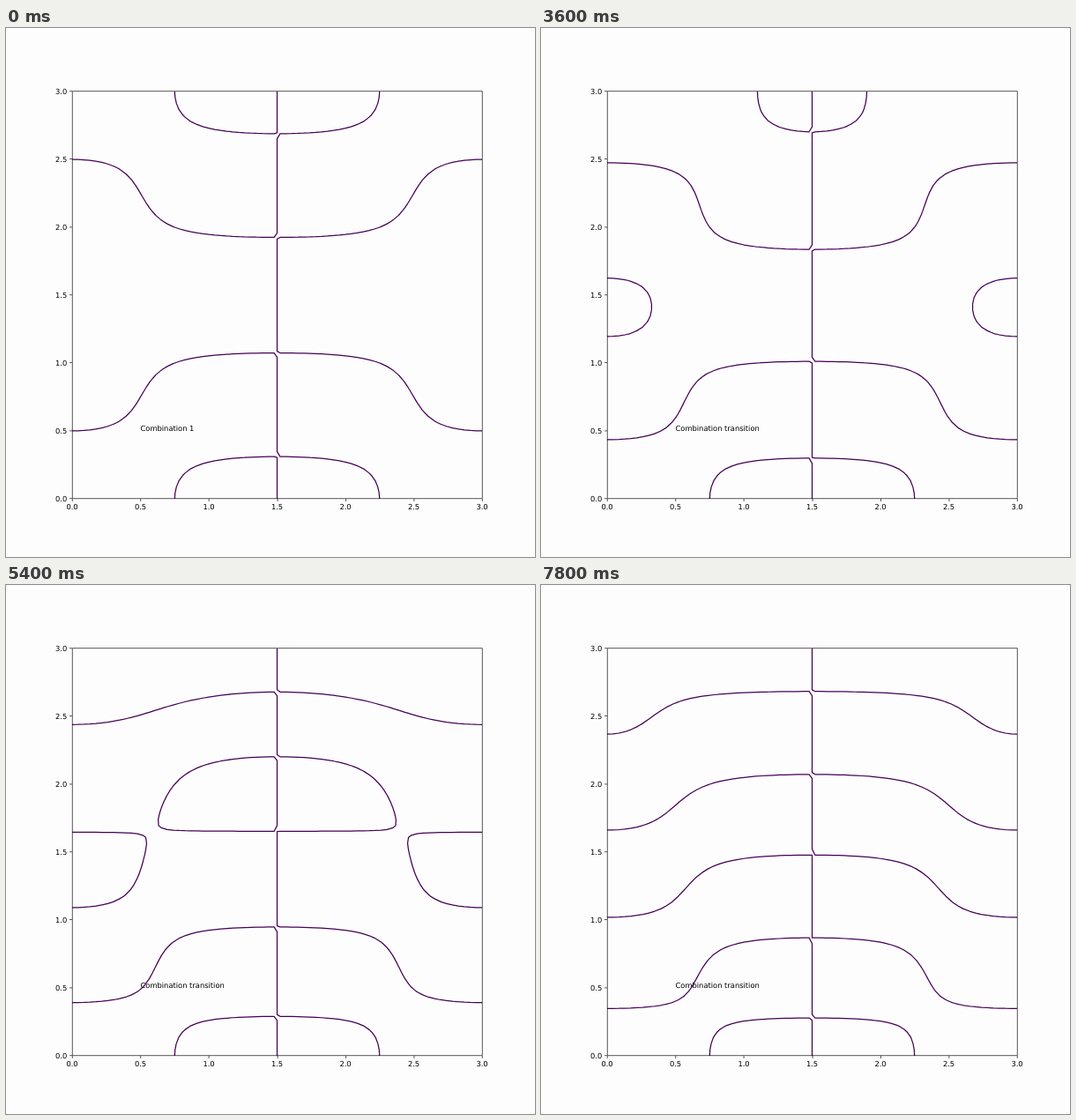
These frames come from a looping animation (600x600 px, 8 s). An HTML page:

```html
<!DOCTYPE html>
<html lang="en">
<head>
<meta charset="utf-8">
<title>Nodal lines of a mode combination</title>
<style>
  html, body { margin: 0; width: 100%; height: 100%; overflow: hidden; background: #fefdfe; }
  svg { display: block; width: 600px; height: 600px; }
  text { font: 8.333px "DejaVu Sans", sans-serif; fill: #000; text-rendering: geometricPrecision; }
  #axes { fill: none; stroke: #000; stroke-width: .667; }
  #nodes { fill: none; stroke: #440154; stroke-width: 1.25; stroke-linecap: round; }
</style>
</head>
<body>
<svg viewBox="0 0 600 600">
  <clipPath id="plot"><rect x="75" y="72" width="465" height="462"/></clipPath>
  <path id="nodes" clip-path="url(#plot)"/>
  <path id="axes"/>
  <g id="labels"></g>
  <text id="caption" x="152.5" y="457"></text>
</svg>
<script>
const LOOP = 8000, HOLD = 1500, STEPS = 49;
const N = 70, LAST = N - 1;
const LEFT = 75, BOTTOM = 534, WIDTH = 465, HEIGHT = 462;
const el = id => document.getElementById(id);
const px = u => LEFT + WIDTH * u;
const py = v => BOTTOM - HEIGHT * v;

function drawAxes() {
  const snapX = x => (Math.floor(x / .6 + .5) + .5) * .6;
  const snapY = y => (Math.floor(y / .6 + .5) - .5) * .6;
  const l = snapX(px(0)), r = snapX(px(1)), b = snapY(py(0)), t = snapY(py(1));
  let d = `M${l} ${b}H${r}V${t}H${l}Z`, labels = '';
  for (let i = 0; i <= 6; i++) {
    const x = px(i / 6), y = py(i / 6), name = (i / 2).toFixed(1);
    d += `M${snapX(x)} 534v2.9M75 ${snapY(y)}h-2.9`;
    labels += `<text x="${x}" y="546.2" text-anchor="middle">${name}</text>` +
              `<text x="69.2" y="${y + 3.1}" text-anchor="end">${name}</text>`;
  }
  el('axes').setAttribute('d', d);
  el('labels').innerHTML = labels;
}

// Zero contour of cos(x)·a(y) + cos(3x)·b(y), blended between two mode pairs
function nodalPath(s) {
  const angle = i => Math.PI * i / LAST;
  const a = [], b = [], z = [];
  for (let j = 0; j < N; j++) {
    const c = n => Math.cos(n * angle(j));
    a[j] = (1 - s) * c(2) + s * c(4);
    b[j] = (1 - s) * c(4) + s * c(5);
    z[j] = [];
    for (let i = 0; i < N; i++)
      z[j][i] = Math.cos(angle(i)) * a[j] + Math.cos(3 * angle(i)) * b[j];
  }

  const cut = (i, j, di, dj) => {
    const p = z[j][i], q = z[j + dj][i + di];
    if (p > 0 === q > 0) return null;
    const k = p / (p - q);
    return px((i + di * k) / LAST).toFixed(2) + ' ' + py((j + dj * k) / LAST).toFixed(2);
  };

  let d = '';
  const join = (p, q) => { d += `M${p}L${q}`; };
  for (let j = 0; j < LAST; j++) {
    for (let i = 0; i < LAST; i++) {
      const bottom = cut(i, j, 1, 0), top = cut(i, j + 1, 1, 0);
      const left = cut(i, j, 0, 1), right = cut(i + 1, j, 0, 1);
      const hits = [bottom, right, top, left].filter(Boolean);
      if (hits.length === 2) join(hits[0], hits[1]);
      if (hits.length === 4) {
        // the small bias settles the balanced saddles on the centre line
        const mid = z[j][i] + z[j][i + 1] + z[j + 1][i] + z[j + 1][i + 1]
                  + 1e-9 * (b[j] + b[j + 1]);
        if (mid > 0 === z[j][i] > 0) {
          join(bottom, right);
          join(left, top);
        } else {
          join(left, bottom);
          join(top, right);
        }
      }
    }
  }
  return d;
}

// Two steps every 300 ms, after holds of 200 and 100 ms
function stepAt(t) {
  if (t < HOLD) return -1;
  const v = t - HOLD;
  return 2 * Math.floor(v / 300) + (v % 300 >= 200 ? 1 : 0);
}

let shown = null;
function draw(now) {
  const step = stepAt(now % LOOP);
  if (step !== shown) {
    shown = step;
    el('nodes').setAttribute('d', nodalPath(Math.max(step, 0) / STEPS));
    el('caption').textContent = 'Combination ' + (step < 0 ? '1' : 'transition');
  }
}

drawAxes();
const start = performance.now();
function tick() {
  draw(performance.now() - start);
  requestAnimationFrame(tick);
}
tick();
</script>
</body>
</html>
```
